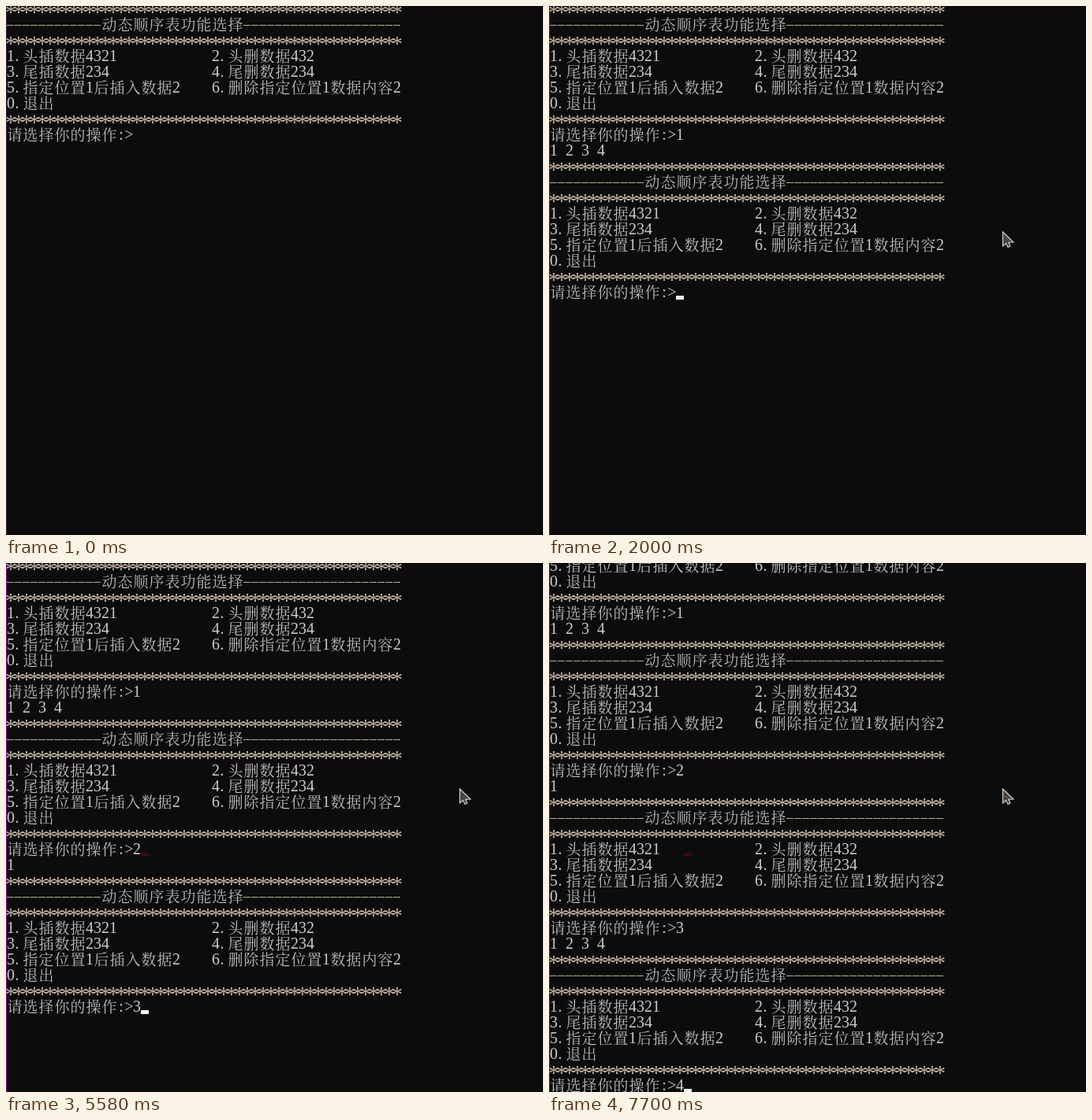
These frames come from a looping animation (681 by 672 pixels, 8 s). An HTML page with a canvas:

```html
<!DOCTYPE html>
<html lang="zh">
<head>
<meta charset="utf-8">
<style>
  html, body { margin: 0; width: 100%; height: 100%; overflow: hidden; background: #0c0c0c; }
  canvas { display: block; }
</style>
</head>
<body>
<canvas id="stage" width="681" height="672"></canvas>
<script>
const ctx = document.getElementById('stage').getContext('2d');
const LOOP = 8000, CELL = 10, ROW = 20, ROUND_ROWS = 10, SCREEN_ROWS = 34;
const ENTER = 390, FOCUS = 600, BLINK = 525, BLINK_START = 120;
const LATIN = '20px "Liberation Serif", serif';
const STAR = '28px "Liberation Serif", serif';
const HAN = '300 19px "Noto Serif CJK SC", "Noto Sans CJK SC", "Noto Sans CJK", sans-serif';

const stars = '*'.repeat(50);
const menu = [
  stars,
  '-'.repeat(12) + '动态顺序表功能选择' + '-'.repeat(20),
  stars,
  '1.头插数据4321'.padEnd(22) + '2.头删数据432',
  '3.尾插数据234'.padEnd(22) + '4.尾删数据234',
  '5.指定位置1后插入数据2    6.删除指定位置1数据内容2',
  '0.退出',
  stars
];

// The user picks 1, 2, 3, 4 in turn; the reply comes with the next menu
const rounds = [
  { shown: 0, typed: 1270, entered: 1930, reply: '1 2 3 4' },
  { shown: 2000, typed: 3330, entered: 4320, reply: '1' },
  { shown: 4320, typed: 5580, entered: 6570, reply: '1 2 3 4' },
  { shown: 6640, typed: 7700, entered: LOOP, reply: '' }
];

const arrow = new Path2D('M0 0V18L4 14.5L6.5 19.5L9.5 18L7.3 13.3L13.5 13Z');

function rect(color, x, y, w, h) {
  ctx.fillStyle = color;
  ctx.fillRect(x, y, w, h);
}

function glyph(ch, font, color, x, y) {
  ctx.font = font;
  ctx.fillStyle = color;
  ctx.fillText(ch, x, y);
}

// y is the middle of the row
function print(text, y) {
  let x = 1;
  for (const ch of text) {
    const wide = ch > '\xff';
    if (ch === '-') rect('#b9ab8f', x, y + 1, 9, 1);
    else if (ch === '*') glyph(ch, STAR, '#c4b5a3', x + 5, y + 14);
    else if (ch === '.') glyph(ch, LATIN, '#ccc', x + 3, y + 7);
    else if (wide) glyph(ch, HAN, '#bcbcbc', x + 10, y + 7.5);
    else if (ch !== ' ') glyph(ch, LATIN, '#ccc', x + 5, y + 7);
    x += wide ? 2 * CELL : CELL;
  }
}

function pointer(t) {
  if (t < ENTER) return;
  const away = (1 - Math.min(1, (t - ENTER) / 350)) ** 2;
  ctx.save();
  ctx.translate(575.5 + 36 * away, 287 - 20 * away);
  ctx.fillStyle = '#4b4642';
  ctx.strokeStyle = '#d0cac4';
  ctx.lineWidth = 1.2;
  ctx.fill(arrow);
  ctx.stroke(arrow);
  ctx.restore();
}

const blinks = t => Math.floor((t - BLINK_START) / BLINK);

// Typing restarts the blink; fresh output also makes it skip one beat
function caret(t, round, promptY) {
  if (t < FOCUS) return;
  const printed = t < round.typed;
  const since = t >= round.entered ? round.entered
    : printed ? Math.max(FOCUS, round.shown) : round.typed;
  const beats = blinks(t) - blinks(since) - (printed ? 1 : 0);
  if (beats > 0 && beats % 2) return;
  const onNewLine = t >= round.entered;
  const col = onNewLine ? 0 : printed ? 16 : 17;
  rect('#f2f2f2', 1 + col * CELL, promptY + 5 + (onNewLine ? ROW : 0), CELL, 5);
}

function draw(t) {
  rect('#0c0c0c', 0, 0, 681, 672);
  // faint stain left behind by the text cursor
  if (t >= 3790) rect('#3a0c0e', 171, 368, 10, 5);

  const current = rounds.findLastIndex(r => t >= r.shown);
  const lastRow = current * ROUND_ROWS + 8;
  const scroll = Math.max(0, lastRow + 1 - SCREEN_ROWS) * ROW;
  const middle = row => row * ROW + 3 - scroll;

  ctx.textAlign = 'center';
  rounds.slice(0, current + 1).forEach((round, i) => {
    const top = i * ROUND_ROWS;
    menu.forEach((line, n) => print(line, middle(top + n)));
    print('请选择你的操作:>' + (t >= round.typed ? i + 1 : ''), middle(top + 8));
    if (i < current) print(round.reply, middle(top + 9));
  });
  caret(t, rounds[current], middle(lastRow));

  rect(t < FOCUS ? '#26364c' : '#8c128a', 0, 0, 1, 672);
  pointer(t);
}

function tick() {
  draw(performance.now() % LOOP);
  requestAnimationFrame(tick);
}
tick();
</script>
</body>
</html>
```
